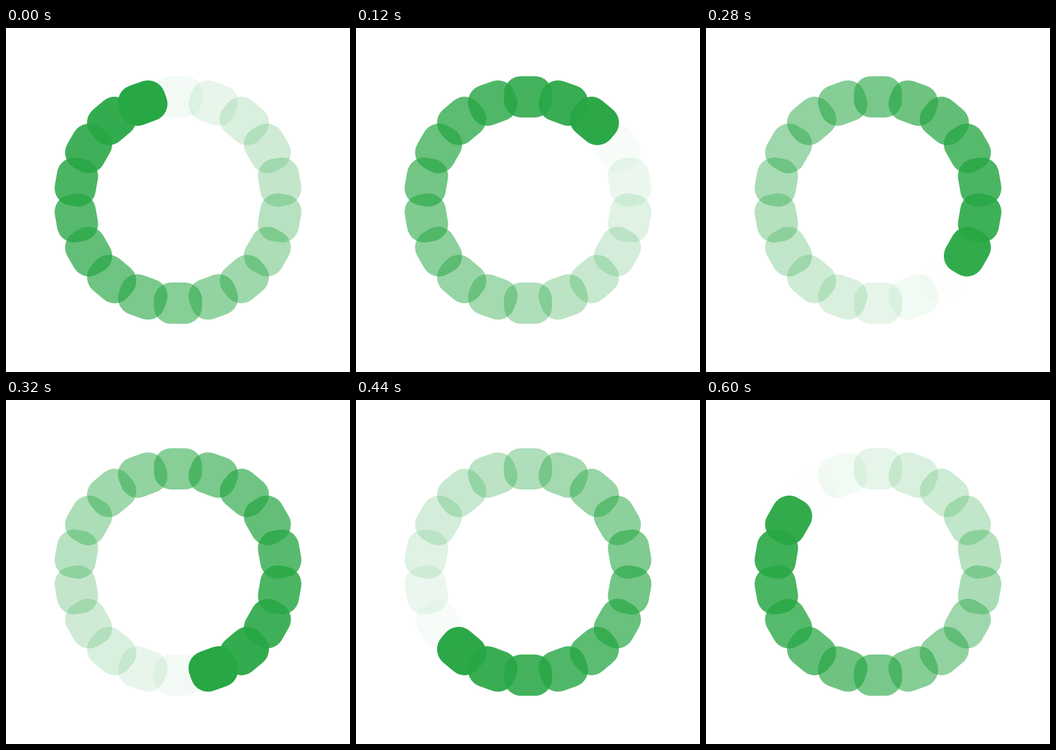
Recreate the animation shown at these times as an HTML page with a canvas. Size 496x496 px, loop 0.64 s.

```html
<!DOCTYPE html>
<html lang="en">
<head>
<meta charset="utf-8">
<title>Loading</title>
<style>
  html, body { margin: 0; width: 100%; height: 100%; overflow: hidden; background: #fff; }
  canvas { display: block; width: 496px; height: 496px; }
</style>
</head>
<body>
<canvas id="stage" width="496" height="496"></canvas>
<script>
  const SIZE = 496, UNIT = SIZE / 100;
  const COUNT = 18, LOOP = 640, STEP = 40;
  const ctx = document.getElementById('stage').getContext('2d');

  const blade = new Path2D();
  blade.roundRect(-7, -36, 14, 12, 5.04);

  function draw(time) {
    const phase = Math.floor(time / STEP + 1e-4) * STEP % LOOP / LOOP;
    ctx.setTransform(1, 0, 0, 1, 0, 0);
    ctx.globalAlpha = 1;
    ctx.fillStyle = '#fff';
    ctx.fillRect(0, 0, SIZE, SIZE);
    ctx.fillStyle = '#28a745';
    for (let i = 0; i < COUNT; i++) {
      // each blade fades linearly from 1 to 0, one slot after its neighbour
      ctx.globalAlpha = 1 - (phase + (COUNT - 1 - i) / COUNT) % 1;
      ctx.setTransform(UNIT, 0, 0, UNIT, SIZE / 2, SIZE / 2);
      ctx.rotate(i * 2 * Math.PI / COUNT);
      ctx.fill(blade);
    }
  }

  function tick(now) {
    draw(now);
    requestAnimationFrame(tick);
  }

  draw(0);
  requestAnimationFrame(tick);
</script>
</body>
</html>
```
